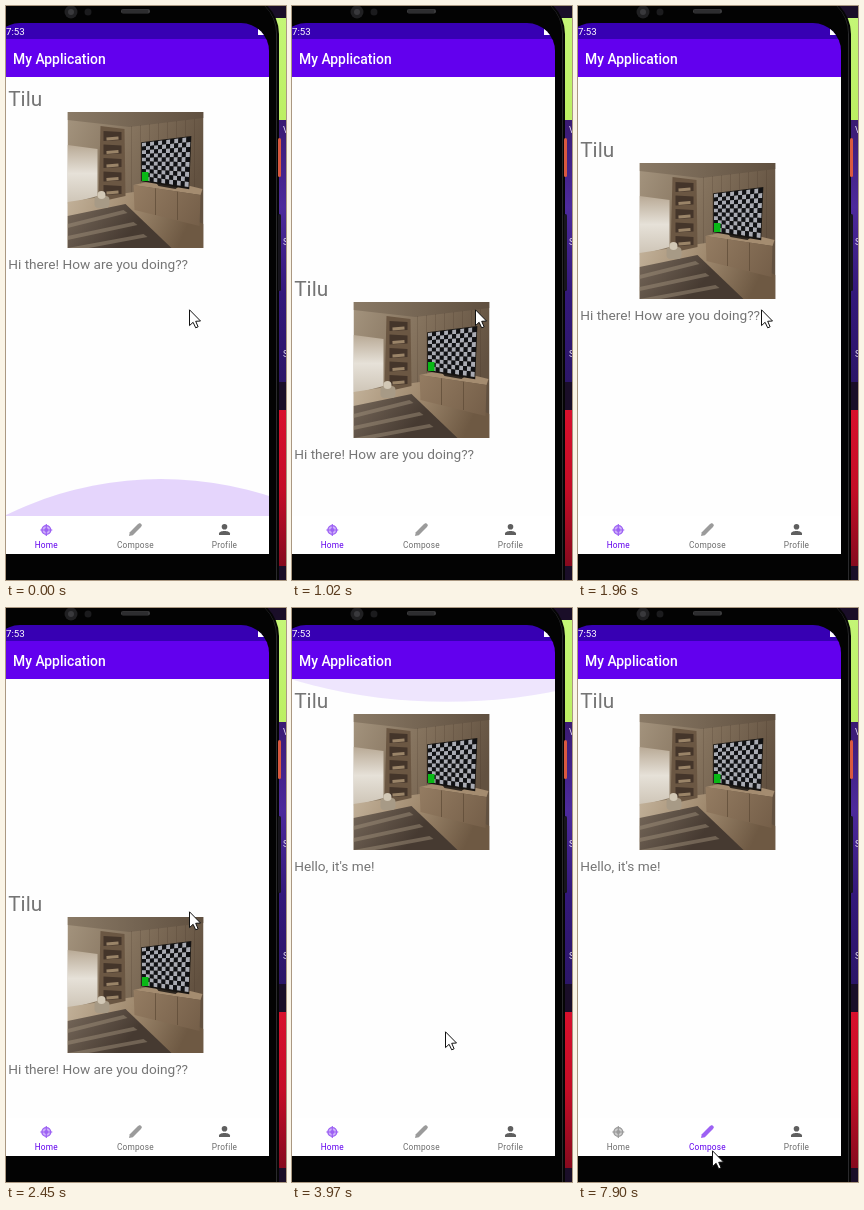
Write an HTML page with a canvas that moves like this. It is 280 px wide and 574 px high and loops after 8000 ms.

```html
<!DOCTYPE html>
<html lang="en">
<head>
<meta charset="utf-8">
<title>My Application</title>
<style>
  html, body { margin: 0; width: 100%; height: 100%; overflow: hidden; background: #000; }
  canvas { display: block; width: 280px; height: 574px; }
</style>
</head>
<body>
<canvas id="stage" width="280" height="574"></canvas>
<script>
const ctx = document.getElementById('stage').getContext('2d');
const LOOP = 8000;
const TICK = 127.4;
const PURPLE = '#6200ee';
const LIST = { top: 71, bottom: 510, right: 263 };
const PAGE = LIST.bottom - LIST.top;
const GREETING = 'Hi there! How are you doing??';
const MESSAGES = ["Hello, it's me!", GREETING, GREETING];
const SELECT_STEP = 38;

// Moves: [first step, last step, destination...], eased out from the previous destination.
const DRAGS = [[1, 4, 836], [5, 8, 688], [9, 11, 550], [11, 15, 388], [16, 19, 236], [19, 25, 0]];
const POINTER = [
  [30, 31, 153, 423], [31, 32, 137, 502], [32, 34, 141, 511], [41, 43, 82, 164],
  [43, 46, 124, 61], [48, 51, 140, 93], [52, 55, 136, 93], [56, 57, 131, 149], [61, 62, 134, 542]
];
const pointerHidden = step => step >= 58 && step < 62;

const mix = (a, b, k) => a + (b - a) * k;
const clamp = k => Math.min(1, Math.max(0, k));

function follow(moves, origin, step, power) {
  return moves.reduce((place, [first, last, ...goal]) => {
    const k = 1 - (1 - clamp((step - first) / (last - first))) ** power;
    return place.map((v, i) => mix(v, goal[i], k));
  }, origin);
}

function box(x, y, w, h, color) {
  ctx.fillStyle = color;
  ctx.fillRect(x, y, w, h);
}

function poly(points, color) {
  ctx.beginPath();
  for (let i = 0; i < points.length; i += 2) ctx.lineTo(points[i], points[i + 1]);
  ctx.closePath();
  ctx.fillStyle = color;
  ctx.fill();
}

function disc(x, y, r, color) {
  ctx.beginPath();
  ctx.arc(x, y, r, 0, Math.PI * 2);
  ctx.fillStyle = color;
  ctx.fill();
}

function rounded(x, y, w, h, r, color) {
  ctx.beginPath();
  ctx.roundRect(x, y, w, h, r);
  ctx.fillStyle = color;
  ctx.fill();
}

function line(x1, y1, x2, y2, color, width = 1) {
  ctx.beginPath();
  ctx.moveTo(x1, y1);
  ctx.lineTo(x2, y2);
  ctx.strokeStyle = color;
  ctx.lineWidth = width;
  ctx.stroke();
}

function text(str, x, y, size, color, weight = 400, align = 'left', spacing = 0) {
  ctx.font = `${weight} ${size}px Roboto, sans-serif`;
  ctx.letterSpacing = spacing + 'px';
  ctx.textAlign = align;
  ctx.fillStyle = color;
  ctx.fillText(str, x, y);
}

function gradient(x1, y1, x2, y2, ...stops) {
  const g = ctx.createLinearGradient(x1, y1, x2, y2);
  stops.forEach((color, i) => g.addColorStop(i / (stops.length - 1), color));
  return g;
}

function clipped(x, y, w, h, draw, radius = 0) {
  ctx.save();
  ctx.beginPath();
  ctx.roundRect(x, y, w, h, radius);
  ctx.clip();
  draw();
  ctx.restore();
}

function drawBackdrop() {
  box(260, 0, 20, 574, '#1a0e28');
  box(260, 12, 20, 102, gradient(0, 12, 0, 114, '#c4f676', '#bcef62'));
  box(260, 114, 20, 262, gradient(0, 114, 0, 376, '#3a1a72', '#4d2a9c', '#33187a', '#2c1668'));
  box(260, 404, 20, 156, gradient(0, 404, 0, 560, '#d8102c', '#c40d26', '#860a1e'));
  ['V', 'S', 'S'].forEach((letter, i) => text(letter, 277, 127 + i * 112, 9, '#e6dff2'));
}

function drawPhone() {
  rounded(-40, -12, 313, 640, 40, '#050505');
  rounded(-40, -11, 311, 640, 39, '#2a2a2c');
  rounded(-40, -11, 310, 640, 38, '#030303');
  rounded(272, 132, 3, 39, 1.5, '#d9593f');
  rounded(272, 208, 3, 77, 1.5, '#17151c');
  disc(65, 6, 6.5, '#202022');
  disc(65, 6, 3, '#39393c');
  disc(82, 6, 3.5, '#1b1b1d');
  rounded(115, 3, 29, 4.5, 2, '#3a3a3c');
  for (let x = 117; x < 143; x += 2) line(x, 3.5, x, 7, '#171719', .7);
}

function drawTv() {
  const cols = 12, rows = 10;
  const point = (u, v) => {
    u /= cols;
    v /= rows;
    return [mix(74.5, mix(123, 121, v), u), mix(mix(31, 25, u), mix(68, 75, u), v)];
  };
  const panel = (c, r, w, h, color) =>
    poly([point(c, r), point(c + w, r), point(c + w, r + h), point(c, r + h)].flat(), color);
  panel(-.2, -.2, cols + .4, rows + .6, '#181512');
  for (let r = 0; r < rows; r++) {
    for (let c = 0; c < cols; c++) panel(c, r, 1, 1, (r + c) % 2 ? '#101114' : '#a9abb3');
  }
  box(74.5, 60, 6.5, 9, '#09b816');
}

function drawRoom() {
  box(0, 0, 136, 136, gradient(0, 0, 136, 50, '#a4947e', '#83715c', '#625140'));
  poly([0, 0, 136, 0, 136, 6, 62, 15, 0, 8], gradient(0, 0, 136, 0, '#8a7a66', '#5f4f3f'));
  poly([0, 33, 30, 37, 30, 84, 0, 92], gradient(0, 33, 0, 90, '#b9aa96', '#e6e1d8', '#cfc6b8'));
  for (let x = 64; x < 136; x += 9) line(x, 14 - (x - 64) / 9, x, 95, 'rgba(60,45,30,.25)', .7);

  poly([0, 90, 66, 80, 136, 112, 136, 136, 0, 136], gradient(0, 85, 110, 136, '#c2b199', '#a18b70', '#6e5943'));
  poly([0, 104, 58, 92, 104, 136, 0, 136], gradient(0, 94, 50, 136, '#76685a', '#463a31'));
  for (let i = 0; i < 3; i++) {
    const y = 112 + i * 12;
    poly([0, y, 56 + i * 10, y - 14, 60 + i * 10, y - 11, 0, y + 4], 'rgba(165,148,126,.45)');
  }

  poly([33, 14, 57, 17, 58, 84, 31, 90], '#6b5743');
  for (let i = 0; i < 5; i++) {
    const y = 19 + i * 13.5;
    poly([36, y, 54, y + 1, 54, y + 9, 36, y + 10], '#44352a');
    line(39, y + 8, 51, y + 7, '#9a8468', 3);
  }
  rounded(27, 84, 15, 12, 4, '#a79a86');
  disc(34, 83, 4, '#d2c8b6');

  poly([66, 73, 94, 67, 135, 77, 133, 83], '#a48c70');
  poly([66, 73, 133, 83, 132, 114, 67, 98], gradient(66, 73, 134, 114, '#947c62', '#745e48'));
  for (let i = 1; i < 3; i++) line(66 + i * 22, 73 + i * 3.4, 66 + i * 22, 98 + i * 5, '#5c4936', .7);
  poly([88, 70, 112, 74, 108, 77, 91, 74], '#2c251e');
  drawTv();
}

function drawItem(message, top) {
  text('Tilu', 2.2, top - 5.6, 20.8, '#757575');
  text(message, 2.2, top + 157.4, 13.65, '#757575');
  ctx.save();
  ctx.translate(61.5, top);
  clipped(0, 0, 136, 136, drawRoom);
  ctx.restore();
}

// The overscroll arc; size runs from 0 to 1, direction 1 rises and -1 hangs.
function drawGlow(size, y, direction) {
  if (size <= 0) return;
  ctx.save();
  ctx.globalAlpha = .16 * size;
  ctx.translate(155, y);
  ctx.scale(1, direction * size);
  disc(0, 314, 351, PURPLE);
  ctx.restore();
}

function drawList(step) {
  const [scroll] = follow(DRAGS, [2 * PAGE], step, 1.35);
  box(0, LIST.top, LIST.right, PAGE, '#fefefe');
  MESSAGES.forEach((message, i) => drawItem(message, 106 + i * PAGE - scroll));
  drawGlow(step < 5 ? 1 - step / 5.7 : 0, LIST.bottom, 1);
  drawGlow(clamp((step - 24) / 3) * clamp((32 - step) / 5) ** .3, LIST.top, -1);
}

function drawBars() {
  box(-14, 17, 277, 16, '#3700b3');
  text('7:53', 0, 29, 9.7, '#fff');
  box(252, 22, 6, 7, '#fff');
  box(-14, 33, 277, 38, PURPLE);
  text('My Application', 7, 57.5, 13.9, '#fff', 500);
}

function homeIcon(color) {
  ctx.save();
  ctx.globalAlpha = .5;
  disc(40.3, 524, 4.5, color);
  ctx.restore();
  disc(40.3, 524, 2, color);
  ctx.beginPath();
  ctx.arc(40.3, 524, 4.4, 0, Math.PI * 2);
  ctx.strokeStyle = color;
  ctx.lineWidth = 1.4;
  ctx.stroke();
  line(34.3, 524, 46.3, 524, color, 1.2);
  line(40.3, 518, 40.3, 530, color, 1.2);
}

function pencilIcon(color) {
  poly([123, 530, 123.8, 526.2, 132, 518, 134, 517, 136, 519, 135, 521, 126.8, 529.2], color);
}

function personIcon(color) {
  disc(218.5, 520.8, 2.8, color);
  ctx.beginPath();
  ctx.moveTo(213, 529);
  ctx.lineTo(213, 527.5);
  ctx.bezierCurveTo(213, 524, 224, 524, 224, 527.5);
  ctx.lineTo(224, 529);
  ctx.fillStyle = color;
  ctx.fill();
}

function drawRipple(k) {
  if (k < 0 || k >= 1) return;
  clipped(0, 510, LIST.right, 38, () => {
    ctx.globalAlpha = mix(.12, .05, k);
    disc(mix(140, 124, k), mix(513, 537, k), mix(28, 60, k), PURPLE);
  });
}

function drawNavigation(step) {
  const selected = step >= SELECT_STEP ? 1 : 0;
  box(-14, 510, 277, 38, '#fff');
  drawRipple((step - SELECT_STEP + 1) / 3);
  [homeIcon, pencilIcon].forEach((icon, i) => icon(i === selected ? '#9d62f4' : '#9b9b9b'));
  personIcon('#5f5f5f');
  ['Home', 'Compose', 'Profile'].forEach((label, i) =>
    text(label, 40.3 + i * 89.1, 541.5, 8.3, i === selected ? PURPLE : '#6c6c6c', 400, 'center', .2));
}

function drawCursor(step) {
  if (pointerHidden(step)) return;
  const [x, y] = follow(POINTER, [183, 303], step, 1.9);
  ctx.save();
  ctx.translate(x + .5, y + .8);
  poly([0, 0, 0, 15.8, 3.6, 12.5, 6.2, 18, 8.6, 17, 6.2, 11.5, 11, 11.2], '#fff');
  ctx.strokeStyle = '#111';
  ctx.lineWidth = 1;
  ctx.stroke();
  ctx.restore();
}

function render(elapsed) {
  const step = Math.floor((elapsed % LOOP) / TICK);
  drawBackdrop();
  box(0, 0, 260, 574, '#000');
  drawPhone();
  clipped(-14, 17, 277, 531, () => {
    clipped(0, LIST.top, LIST.right, PAGE, () => drawList(step));
    drawBars();
    drawNavigation(step);
  }, [28, 28, 0, 0]);
  drawCursor(step);
}

let start;
function tick(now) {
  start ??= now;
  render(Math.max(0, now - start));
  requestAnimationFrame(tick);
}
render(0);
requestAnimationFrame(tick);
</script>
</body>
</html>
```
